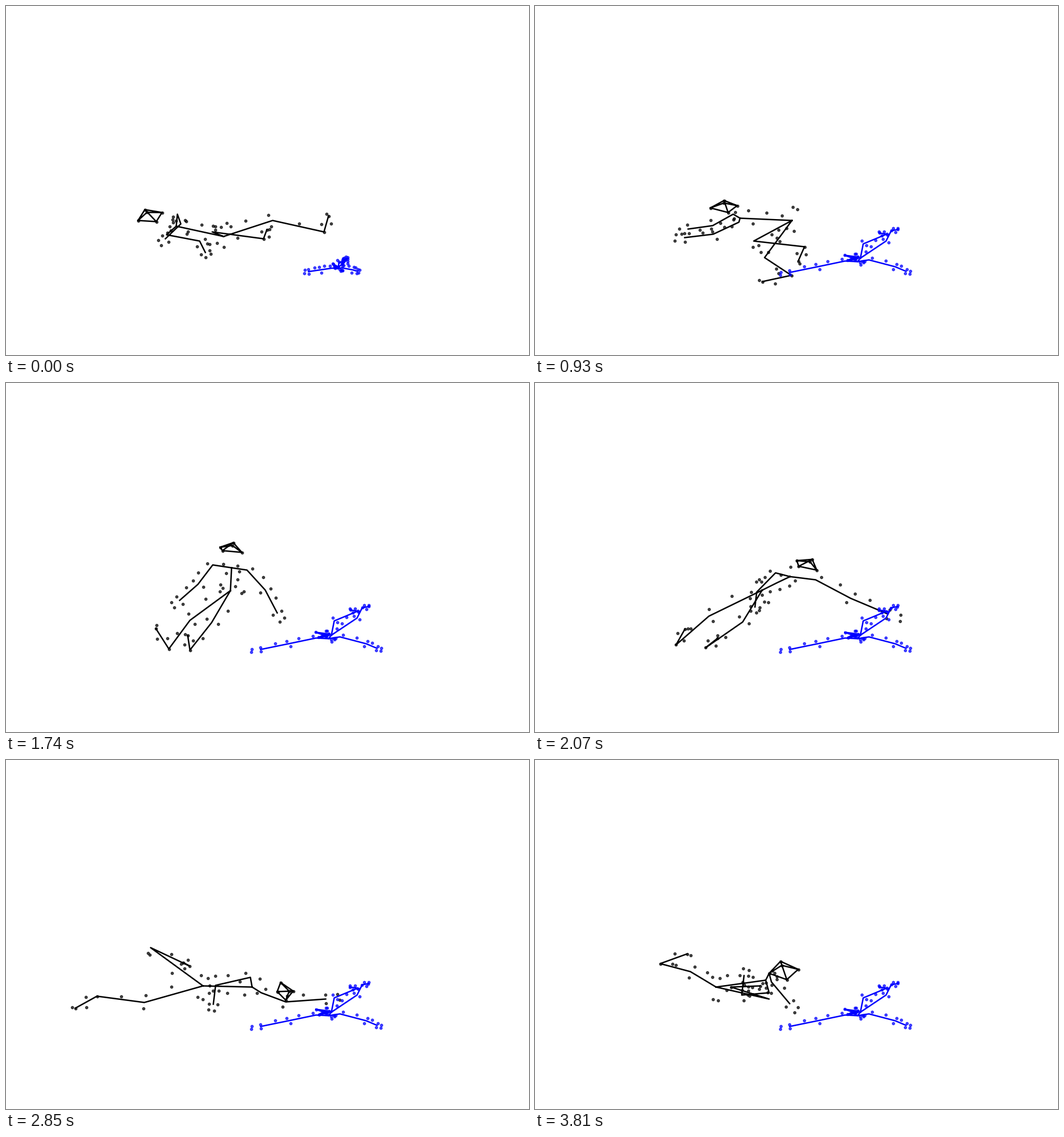
Animation, 917 px wide and 611 px high, one loop 3.84 s. Source, as a matplotlib script:

```python
import numpy as np
import matplotlib.pyplot as plt
from matplotlib.animation import FuncAnimation

W, H, DPI = 917, 611, 100
STEP, LOOP = 30, 3840

# Joint rows of a pose
HIP, CHEST, SPINE, CROWN = 0, 1, 18, 19
ARM_A, ARM_B, LEG_L, LEG_R = [2, 3, 4], [5, 6, 7], [8, 9, 10], [11, 12, 13]
A, B, C, D = HEAD = [14, 15, 16, 17]

CHAINS = [[HIP, SPINE, CHEST], [CHEST] + ARM_A, [CHEST] + ARM_B,
          [HIP] + LEG_L, [HIP] + LEG_R, HEAD + [A], [B, D], [A, CROWN, C]]
DOTTED = LEG_L[1:] + LEG_R[1:] + HEAD + [CROWN]

# Markers on a limb: distance along it in bones, offset to the outer side
ARM = [(.1, 9), (.6, 12), (.95, -10), (1.05, 10), (1.45, 10),
       (2, 8), (2, -8), (2.3, 7), (2.35, -3)]
LEG = [(.5, 14), (.95, 11), (1, -11), (1.5, 5), (2.4, 8), (2.6, -8), (3.1, 4)]
TRUNK = [(2.3, -15), (2.2, 10), (1.7, 14), (1.5, -9), (1, 12), (.5, -18),
         (.4, 8), (.2, -14), (-.1, -18), (0, 24), (-.2, 20)]
LIMBS = [(ARM_A, ARM, -1), (ARM_B, ARM, 1), ([HIP] + LEG_L, LEG, -1),
         ([HIP] + LEG_R, LEG, 1), ([HIP, SPINE, CHEST], TRUNK, -1)]


def pose(trunk, arm_a, arm_b, leg_l, leg_r, head):
    """Key points of one posture; spine and crown follow from the others."""
    p = np.array(trunk + arm_a + arm_b + leg_l + leg_r + head, float)
    spine = (p[HIP] + p[CHEST]) / 2
    crown = .6 * p[B] + .2 * (p[A] + p[C])
    return np.vstack([p, spine, crown])


lying = pose([(381, 403), (298, 385)],
             [(300, 364), (306, 381), (279, 407)],
             [(281, 400), (339, 411), (349, 431)],
             [(361, 395), (451, 407), (457, 391)],
             [(467, 375), (557, 395), (565, 367)],
             [(231, 375), (243, 356), (273, 361), (263, 377)])

bridge = pose([(400, 408), (310, 404)],
              [(296, 409), (244, 402), (189, 398)],
              [(316, 403), (376, 401), (356, 377)],
              [(466, 371), (449, 417), (492, 440)],
              [(456, 334), (487, 386), (542, 374)],
              [(245, 384), (263, 386), (271, 407), (245, 402)])

crouch = pose([(450, 375), (359, 371)],
              [(357, 378), (312, 399), (262, 405)],
              [(347, 364), (311, 384), (268, 390)],
              [(402, 440), (449, 471), (398, 482)],
              [(383, 411), (472, 421), (461, 446)],
              [(307, 353), (331, 340), (354, 349), (338, 361)])

upright = pose([(393, 363), (395, 323)],
               [(362, 318), (336, 352), (304, 380)],
               [(422, 327), (454, 362), (475, 402)],
               [(322, 415), (285, 465), (262, 429)],
               [(360, 419), (322, 467), (318, 441)],
               [(375, 287), (398, 279), (413, 296), (379, 293)])

lunge = pose([(345, 362), (425, 365)],
             [(416, 355), (366, 384), (385, 410)],
             [(445, 373), (490, 400), (552, 406)],
             [(236, 404), (166, 446), (194, 432)],
             [(290, 415), (232, 452), (269, 452)],
             [(465, 349), (493, 356), (490, 376), (468, 364)])

stretch = pose([(345, 395), (431, 397)],
               [(428, 380), (367, 394), (363, 427)],
               [(447, 407), (490, 423), (560, 418)],
               [(242, 424), (159, 413), (121, 434)],
               [(253, 328), (321, 360), (310, 354)],
               [(481, 389), (503, 404), (490, 420), (475, 405)])

curl = pose([(317, 397), (404, 385)],
            [(410, 407), (362, 411), (366, 377)],
            [(410, 373), (414, 388), (446, 426)],
            [(272, 370), (219, 356), (266, 339)],
            [(410, 418), (343, 397), (394, 395)],
            [(410, 373), (430, 352), (461, 366), (441, 384)])

spread = pose([(570, 441), (565, 447)],
              [(543, 446), (495, 456), (446, 466)],
              [(585, 444), (631, 456), (650, 464)],
              [(575, 416), (616, 399), (603, 397)],
              [(615, 411), (624, 393), (635, 391)],
              [(543, 436), (566, 439), (548, 445), (562, 443)])


class Track:
    """Monotone cubic path through timed poses."""

    def __init__(self, times, poses):
        self.t, self.p = np.array(times, float), np.array(poses)
        m = np.diff(self.p, axis=0) / np.diff(self.t)[:, None, None]
        a, b = m[:-1], m[1:]
        same = a * b > 0
        self.d = np.zeros_like(self.p)
        self.d[1:-1] = np.where(same, 2 * a * b / np.where(same, a + b, 1), 0)
        self.d[0], self.d[-1] = m[0], m[-1] / 2

    def at(self, t):
        i = min(np.searchsorted(self.t, t, side="right"), len(self.t) - 1) - 1
        h = self.t[i + 1] - self.t[i]
        u = (t - self.t[i]) / h
        p, d = self.p, self.d
        return ((1 + 2 * u) * (1 - u) ** 2 * p[i] + u * (1 - u) ** 2 * h * d[i]
                + u * u * (3 - 2 * u) * p[i + 1] + u * u * (u - 1) * h * d[i + 1])


def bump(t, mid, half):
    u = abs(t - mid) / half
    return np.cos(np.pi * u / 2) ** 2 if u < 1 else 0.0


def swing(p, limb, reach):
    """Push a limb sideways, further towards its tip."""
    p[limb, 0] += reach * np.arange(1, 4) / 3


track = Track([0, 420, 930, 1740, 2400, 2850, 3810],
              [lying, bridge, crouch, upright, lunge, stretch, curl])


def black_pose(t):
    p = track.at(t)
    swing(p, LEG_R, 230 * bump(t, 1300, 360))
    swing(p, ARM_B, 60 * bump(t, 2050, 300))
    swing(p, LEG_L, -45 * bump(t, 2625, 220))
    p[:, 0] += 35 * bump(t, 2050, 300)
    return p


def blue_pose(t):
    """Unfold with a damped overshoot, then lie still."""
    scale = np.full((len(spread), 2), (.25, .3))
    scale[ARM_A + ARM_B, 0] = .42
    folded = (582, 457) + (spread - spread[HIP]) * scale
    s = 1 - np.exp(-t / 130) * np.cos(np.pi * t / 350)
    return folded + s * (spread - folded)


def markers(p, width):
    pts = []
    for chain, spots, side in LIMBS:
        for u, off in spots:
            i = min(int(max(u, 0)), len(chain) - 2)
            a, b = p[chain[i]], p[chain[i + 1]]
            v = b - a
            normal = np.array([v[1], -v[0]]) / max(np.hypot(*v), 1)
            pts.append(a + (u - i) * v + side * width * off * normal)
    return pts


fig = plt.figure(figsize=(W / DPI, H / DPI), dpi=DPI, facecolor="white")
ax = fig.add_axes([0, 0, 1, 1])
ax.set(xlim=(-.5, W - .5), ylim=(H - .5, -.5))
ax.axis("off")


class Dancer:
    def __init__(self, color, pose_at, width):
        self.pose_at, self.width = pose_at, width
        self.dots, = ax.plot([], [], "o", color=color, ms=3.1, mew=1, alpha=.7)
        self.bones, = ax.plot([], [], color=color, lw=1.8)

    def draw(self, t):
        p = self.pose_at(t)
        gap = [[np.nan, np.nan]]
        self.bones.set_data(*np.vstack([r for c in CHAINS for r in (p[c], gap)]).T)
        self.dots.set_data(*np.vstack([p[DOTTED], markers(p, self.width)]).T)
        return [self.dots, self.bones]


dancers = [Dancer("black", black_pose, 1), Dancer("blue", blue_pose, .5)]


def draw(n):
    return [art for d in dancers for art in d.draw(n * STEP)]


anim = FuncAnimation(fig, draw, frames=LOOP // STEP, interval=STEP,
                     init_func=lambda: draw(0), repeat=True, repeat_delay=0)
plt.show()
```
